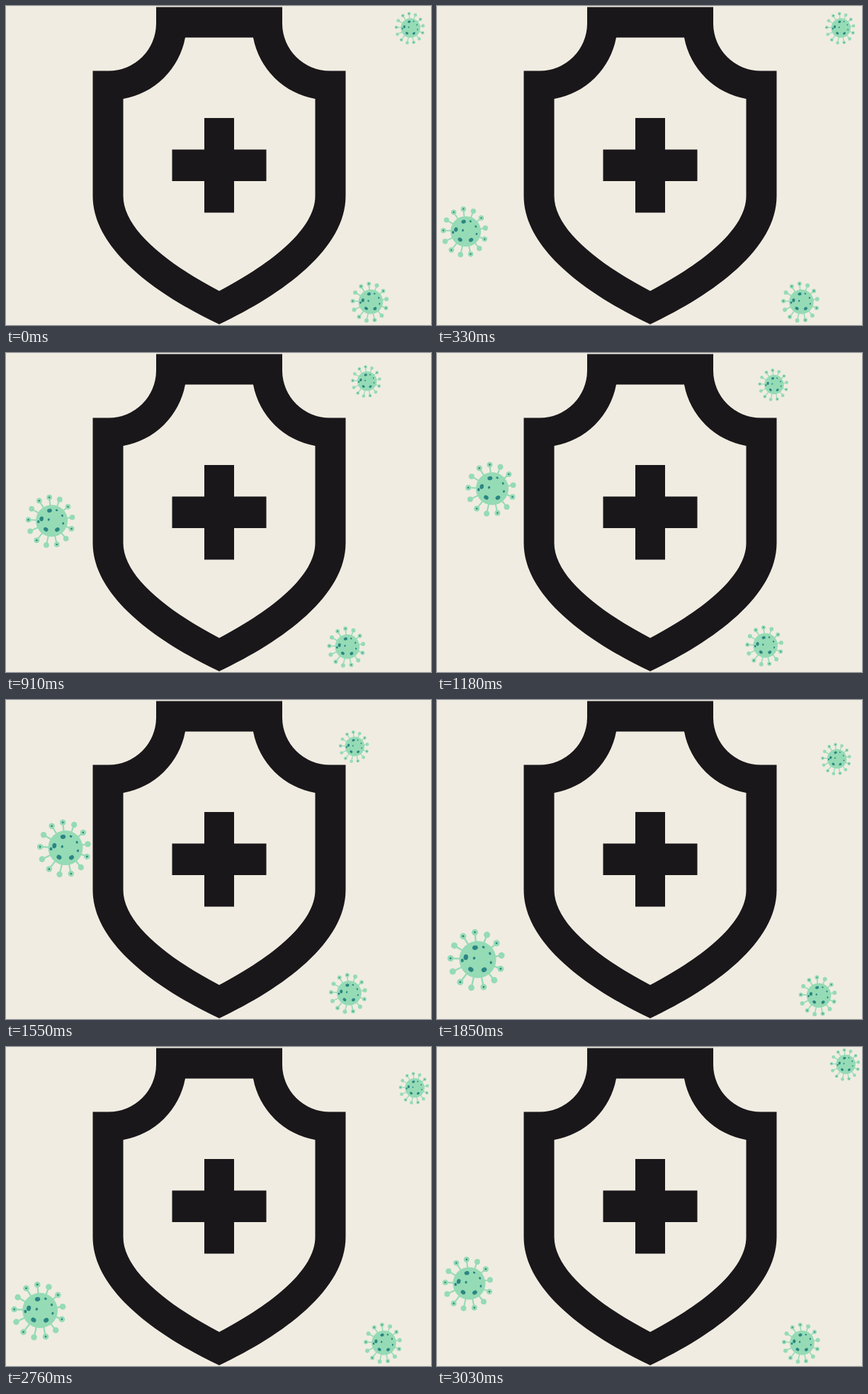
Write an HTML page that moves like this. It is 600 px wide and 450 px high and loops after 3060 ms.

```html
<!DOCTYPE html>
<html lang="en">
<head>
<meta charset="utf-8">
<title>Shield and viruses</title>
<style>
  html, body { margin: 0; width: 100%; height: 100%; overflow: hidden; background: #f0ece1; }
  svg { display: block; width: 100vw; height: 100vh; }
</style>
</head>
<body>
<svg viewBox="0 0 600 450">
  <rect width="600" height="450" fill="#f0ece1"/>
  <g fill="#19171a">
    <path fill-rule="evenodd" d="M212 1.5H390V25A67 67 0 0 0 457 91.5H479.5V268C479.5 342 392 406 301 449C210 406 122.5 342 122.5 268V91.5H145A67 67 0 0 0 212 25Z
      M253 44.5A108 108 0 0 1 165.5 131V268C165.5 313 223 361 301 402C379 361 436.5 313 436.5 268V131A108 108 0 0 1 349 44.5Z"/>
    <path d="M280 158H322V202.500H367.500V247H322V291.500H280V247H234.500V202.500H280Z"/>
  </g>
  <g id="viruses"></g>
</svg>
<script>
const LOOP = 3060;
const SVG_NS = 'http://www.w3.org/2000/svg';
const LIGHT = '#95dbb5', DARK = '#2c8583';
const SPIKES = 13, VIRUS_HEIGHT = 82;

// Each point is [x, y, height]; "bend" curves the way from near to far.
const viruses = [
  { // upper right
    start: [570, 31.5, 46], near: [458.5, 47.5, 46], bend: [509, 83, 46],
    far: [576, 84, 46], end: [576, 25, 46], appears: 0
  },
  { // left
    start: [38.5, 320, 72], near: [82.5, 170.5, 78], bend: [89, 210.5, 85],
    far: [48, 402, 88], end: [43.5, 334.5, 77], appears: 30
  },
  { // lower right
    start: [513.5, 418, 58], near: [453.5, 412.5, 58], bend: [502, 415, 58],
    far: [546, 418, 58], end: [514, 418, 58], appears: 0
  }
];

function add(parent, tag, attrs = {}) {
  const node = document.createElementNS(SVG_NS, tag);
  for (const name in attrs) node.setAttribute(name, attrs[name]);
  return parent.appendChild(node);
}

function polar(degrees, rx, ry = rx) {
  const a = degrees * Math.PI / 180;
  return [rx * Math.cos(a), ry * Math.sin(a)];
}

function addSpots(parent, count, from, step, distance, radius) {
  for (let i = 0; i < count; i++) {
    const angle = from + i * step;
    const [x, y] = polar(angle, distance);
    add(parent, 'ellipse', {
      rx: radius, ry: radius * 0.8, fill: DARK,
      transform: `translate(${x} ${y}) rotate(${angle + 90})`
    });
  }
}

function buildVirus(parent) {
  const root = add(parent, 'g');
  for (let i = 0; i < SPIKES; i++) {
    const [x, y] = polar(i * 360 / SPIKES - 93, 34, 37);
    add(root, 'path', { d: `M2 -1L${x} ${y}`, stroke: LIGHT, 'stroke-width': 2.2 });
    add(root, 'circle', { cx: x, cy: y, r: 4.2, fill: LIGHT });
    if (i % 2 === 0) add(root, 'circle', { cx: x, cy: y, r: 1.3, fill: DARK });
  }
  const body = add(root, 'g', { transform: 'translate(2 -1)' });
  add(body, 'circle', { r: 24.5, fill: LIGHT });
  addSpots(body, 4, 58, 66.5, 16, 3.7);
  addSpots(body, 3, -65, 39, 18, 1.9);
  addSpots(body, 1, 201, 0, 5, 2);
  addSpots(body, 1, 176, 0, 20.5, 2.3);
  return root;
}

const progress = (t, from, to) => Math.max(0, Math.min(1, (t - from) / (to - from)));
const smooth = u => u * u * (3 - 2 * u);
const easeOut = u => 1 - (1 - u) ** 3;
const easeIn = u => u * u;
const mix = (a, b, u) => a.map((v, i) => v + (b[i] - v) * u);

function poseAt({ start, near, bend, far, end }, t) {
  if (t < 1470) return mix(start, near, smooth(progress(t, 270, 1470)));
  if (t < 2240) {
    const u = easeOut(progress(t, 1470, 2170));
    return mix(mix(near, bend, u), mix(bend, far, u), u);
  }
  return mix(far, end, easeIn(progress(t, 2240, 3030)));
}

const layer = document.getElementById('viruses');
const nodes = viruses.map(() => buildVirus(layer));

function render(ms) {
  const t = ms % LOOP;
  viruses.forEach((virus, i) => {
    const [x, y, height] = poseAt(virus, t);
    nodes[i].setAttribute('transform', `translate(${x} ${y}) scale(${height / VIRUS_HEIGHT})`);
    nodes[i].setAttribute('visibility', t >= virus.appears ? 'visible' : 'hidden');
  });
}

const startTime = performance.now();
function tick() {
  render(performance.now() - startTime);
  requestAnimationFrame(tick);
}
tick();
</script>
</body>
</html>
```
